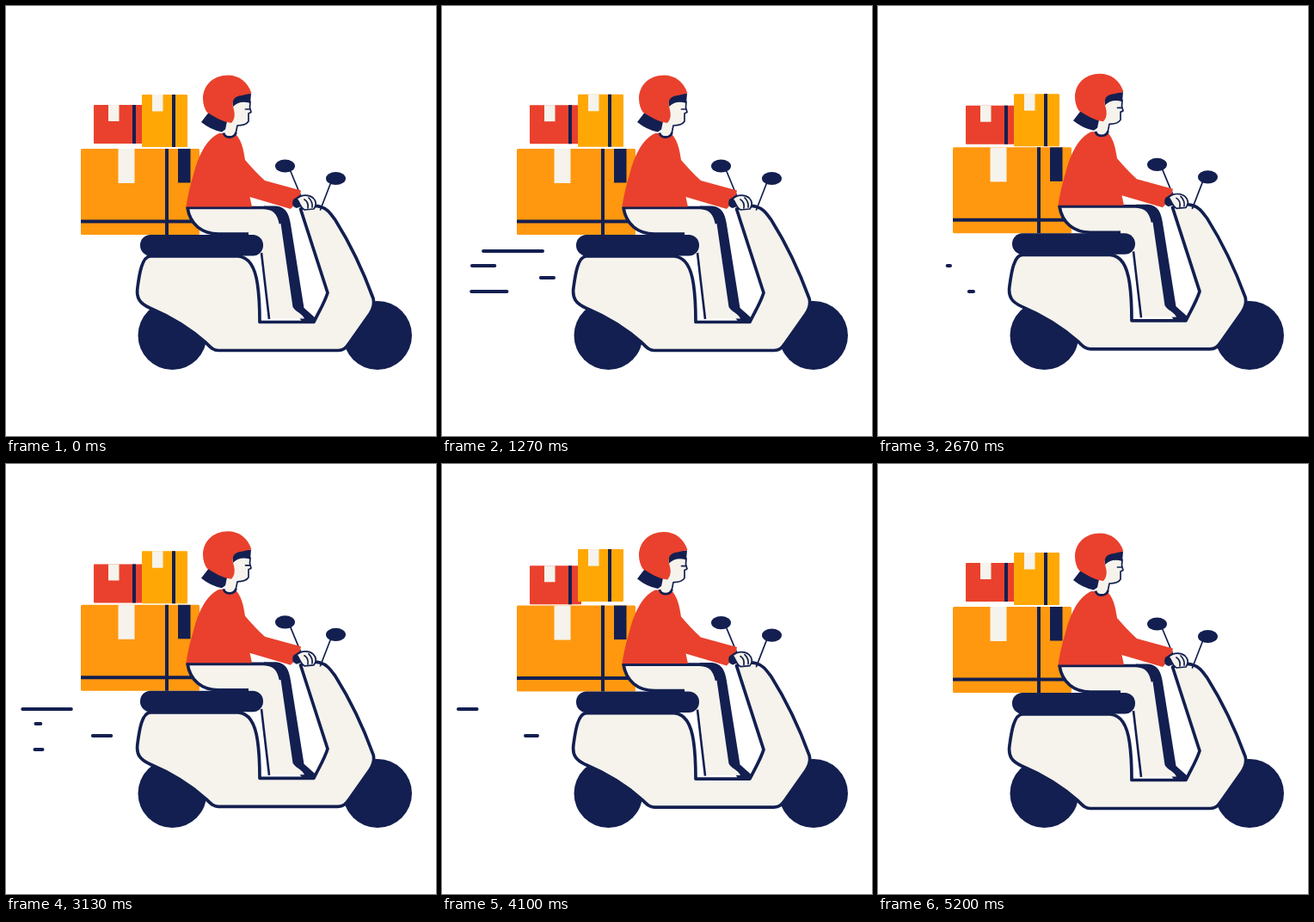
These frames come from a looping animation (500 px wide and 500 px high, 5.23 s). An HTML page:

```html
<!DOCTYPE html>
<html lang="en">
<head>
<meta charset="utf-8">
<title>Delivery scooter</title>
<style>
  html, body { margin: 0; width: 100%; height: 100%; overflow: hidden; background: #fff; }
  svg { display: block; width: 100%; height: 100%; }
  .navy { fill: #131f50; }
  .cream { fill: #f5f3ec; }
  .red { fill: #e9412d; }
  .line, .edge, .thin { stroke: #131f50; stroke-linejoin: round; }
  .line { fill: none; stroke-width: 4; }
  .edge { stroke-width: 3.7; }
  .thin { stroke-width: 1.7; stroke-linecap: round; }
  .open { fill: none; }
  #speed line { stroke: #131f50; stroke-width: 4; stroke-linecap: round; }
</style>
</head>
<body>
<svg viewBox="0 0 500 500">
  <g id="speed"></g>

  <circle class="navy" cx="193.500" cy="383" r="40"/>
  <circle class="navy" cx="432" cy="383" r="40"/>

  <g id="redBox">
    <rect class="red" x="102" y="115" width="60" height="45" rx="1"/>
    <rect class="cream" x="119" y="115" width="12.500" height="19"/>
    <path class="line" d="M149 115v45"/>
  </g>
  <g id="yellowBox">
    <rect fill="#ffa805" x="158" y="103" width="53" height="61" rx="1"/>
    <rect class="cream" x="170" y="103" width="12.500" height="19.500"/>
    <path class="line" d="M195 103v61"/>
  </g>

  <g id="body">
    <!-- large parcel -->
    <rect fill="#ff980f" x="87" y="166" width="138" height="100" rx="1.500"/>
    <rect class="cream" x="130.500" y="166" width="19" height="40"/>
    <rect class="navy" x="200" y="166" width="14.500" height="39.500"/>
    <path class="line" d="M87 250.500H225M187 166V266"/>

    <!-- far leg -->
    <path class="navy" d="M300 232.500H314C326 234 329 242 331 254L346.500 351L360 363L357 368H345L328 345Z"/>

    <!-- scooter -->
    <path class="cream edge" d="M168 291H270C284 292 290 306 292.500 324C294.500 338 295 352 295 367.500H358
      C364 355 370 346 374 333.500L342.500 236C348 233 358 231 366 233.500C374 236 377 241 383 249
      C400 276 416 310 427 340C429 347 427 352 423 358L399 392C395 398 392 400.500 386 400.500H247
      C241 400.500 238 397 233 392C214 375 193 362 167 351C156 346 151 340 153 327C155 312 158 291 168 291Z"/>

    <!-- near leg -->
    <path class="cream" d="M211 234.500H300C312 235 317 241 319.500 253L333.500 350
      C337 356 344 357 347 363.500H306L297 287C296 274 294 265 282 265H247C228 265 214 254 211 234.500Z"/>
    <path class="edge open" d="M319.500 253C317 241 312 235 300 234.500H211C214 254 228 265 247 265H282"/>
    <path class="open" stroke="#131f50" stroke-width="2.600" d="M297 287L306 364"/>
    <rect class="navy" x="156" y="266" width="143" height="24.500" rx="12"/>

    <!-- mirrors -->
    <path class="thin open" d="M330 190L342 219M377.500 206L365.500 237"/>
    <ellipse class="navy" cx="324.500" cy="186" rx="11.500" ry="7.600"/>
    <ellipse class="navy" cx="383.500" cy="200.500" rx="11.500" ry="7.600"/>

    <!-- torso and arm -->
    <path class="red" d="M248 148C231 155 222 180 218 196C213 213 211 223 209.500 233.500H286L283.500 222
      L331 236C336 231 341 225 343 214.500L301 203C292 195 285 187 278 179C276 165 273 154 266 148Z"/>

    <!-- hand -->
    <path class="navy" d="M334 225L343 219L349 231L338 235Q331 233 334 225Z"/>
    <path class="cream thin" d="M338 224C344 219 352 219 357 223C361 227 361 232 358 236L347 237C342 234 343 231 338 224Z"/>
    <path class="thin open" d="M347 225Q352 228 351 235M352 223Q357 228 356 234"/>

    <!-- head -->
    <path class="navy" d="M237 122L227 135Q238 144 251 146.500L264 137Z"/>
    <path class="cream" d="M262 106H284L283.500 118L285 123.500L282 125L281.500 134Q280 139 269 139L267 150Q260 155 254 149L257 134Z"/>
    <path class="thin open" d="M284 111L283.500 118L285 123.500L282 125V134Q279 139 269 139L267 149M278.500 120H283"/>
    <path class="open" stroke="#131f50" stroke-width="2.800" d="M253 147.500Q254 152.500 260 152.500Q266 152.500 267.500 147"/>
    <path class="navy" d="M262 102H285L284 113Q272 109 264 117Z"/>
    <path class="red" d="M285.500 101.500C281 88 271 80.500 258 80.500C241 80.500 229 92 229 108C229 114 231 120 234 124
      C242 128 251 135 262 136C267 131 266 124 264.500 119C262 110 265 105 274 104Z"/>
  </g>
</svg>
<script>
const LOOP = 5230, CYCLE = 26, HOP = 13, DRAW = 12.7;
const $ = id => document.getElementById(id);
const ease = (f, start, length) => {
  const p = Math.min(1, Math.max(0, (f - start) / length));
  return p * p * (3 - 2 * p);
};
const shift = (id, y) => $(id).setAttribute('transform', `translate(0 ${y.toFixed(2)})`);

// Each streak grows leftwards, then its right end follows.
const streaks = [
  { y: 285, from: 124, to: 19, head: 3.7, tail: 10 },
  { y: 302, from: 84, to: 34.5, head: 0, tail: 6 },
  { y: 316, from: 130, to: 97, head: 6, tail: 12 },
  { y: 332, from: 111, to: 33.5, head: 0, tail: 6 }
];
for (const s of streaks) {
  s.el = document.createElementNS('http://www.w3.org/2000/svg', 'line');
  s.el.setAttribute('y1', s.y);
  s.el.setAttribute('y2', s.y);
  $('speed').append(s.el);
}

function draw(ms) {
  const frame = Math.floor((ms % LOOP) * 0.03 + 0.11);
  const f = frame % CYCLE, h = frame % HOP;

  for (const s of streaks) {
    const head = ease(f, s.head, DRAW), tail = ease(f, s.tail, DRAW);
    s.el.setAttribute('x1', s.from + (s.to - s.from) * head);
    s.el.setAttribute('x2', s.from + (s.to - s.from) * tail);
    s.el.style.display = head > tail ? '' : 'none';
  }

  const hop = (1 - Math.cos(2 * Math.PI * h / HOP)) / 2;
  shift('yellowBox', -4 * hop);
  shift('redBox', 3.3 * hop);
  shift('body', -2.2 * (ease(h, 0, 3) - ease(h, 3, 7.5)));
}

const begin = performance.now();
function tick() {
  draw(performance.now() - begin);
  requestAnimationFrame(tick);
}
tick();
</script>
</body>
</html>
```
